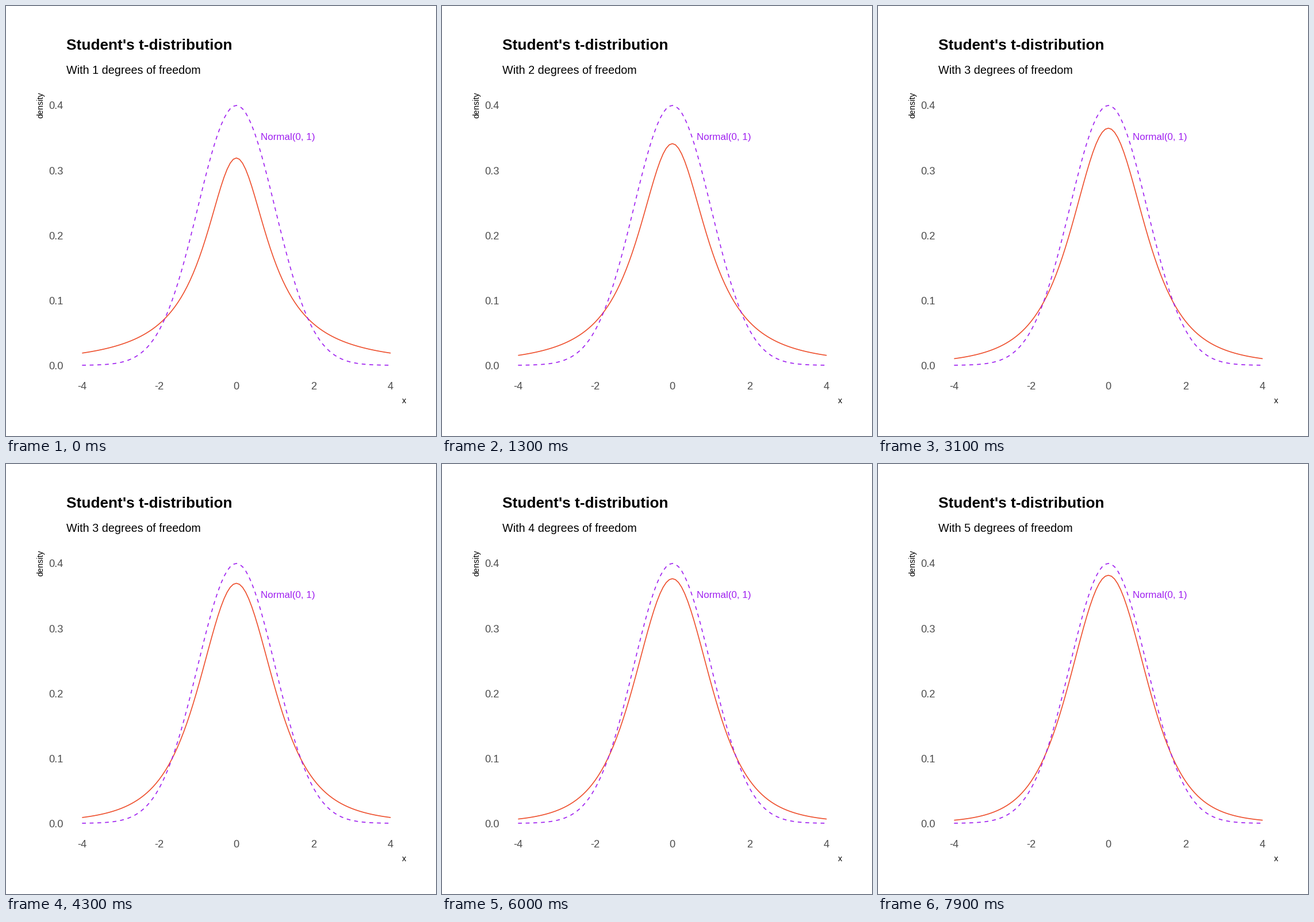
Recreate the animation shown at these times as a matplotlib script. Size 748 px wide and 748 px high, loop 8000 ms.

```python
import math

import matplotlib.pyplot as plt
import numpy as np
from matplotlib.animation import FuncAnimation

SIZE, DPI = 748, 64
FRAMES, INTERVAL = 80, 100
CYCLE, STEPS, LEAD = 17, 8, 8  # frames per state, per morph, before first morph
X0, Y0 = 400.75, 625.0         # pixel position of the data origin
SX, SY = 67.1, 1133.0          # pixels per data unit
LINE = 1.66                    # line width in pixels
RED, PURPLE, GREY = "#ee4f2d", "#a020f0", "#4d4d4d"

plt.rcParams["font.family"] = "Liberation Sans"


def pt(px):
    return px * 72 / DPI


def t_density(x, df):
    scale = math.gamma((df + 1) / 2) / (
        math.sqrt(df * math.pi) * math.gamma(df / 2))
    return scale * (1 + x**2 / df) ** (-(df + 1) / 2)


def to_y(density):
    return Y0 - SY * density


fig = plt.figure(figsize=(SIZE / DPI, SIZE / DPI), dpi=DPI, facecolor="white")
ax = fig.add_axes([0, 0, 1, 1])
ax.set_xlim(0, SIZE)
ax.set_ylim(SIZE, 0)
ax.axis("off")


def label(x, y, text, size, **style):
    return ax.text(x, y, text, fontsize=pt(size), **style)


label(105, 75.5, "Student's t-distribution", 26.3, weight="bold", color="black")
subtitle = label(105.5, 117.5, "", 19.8, color="black")
label(443.5, 232.5, "Normal(0, 1)", 17, color=PURPLE)
label(60, 172, "density", 14.3, color="black", rotation=90,
      ha="center", va="center")
label(692, 691, "x", 14.3, color="black", ha="center")

for i in range(5):
    label(100, to_y(i / 10) + 7.5, f"{i / 10:.1f}", 18.3, color=GREY, ha="right")
for v in range(-4, 5, 2):
    label(X0 + SX * v, 667, str(v), 18.3, color=GREY, ha="center")

x = np.linspace(-4, 4, 101)
px = X0 + SX * x
normal = np.exp(-x**2 / 2) / math.sqrt(2 * math.pi)
curve, = ax.plot(px, to_y(normal), color=RED, lw=pt(LINE),
                 solid_capstyle="butt", zorder=2)
ax.plot(px, to_y(normal), color=PURPLE, lw=pt(LINE), ls=(0, (4, 4)),
        dash_capstyle="butt", zorder=3)


def update(frame):
    # State 0 is the hold before the first morph.
    state, step = divmod(frame - LEAD + CYCLE, CYCLE)
    mix = min(step, STEPS) / STEPS if state else 1
    df = max(state, 1)
    old = t_density(x, df)
    new = t_density(x, df + 1) if state else old
    curve.set_ydata(to_y(old + (new - old) * mix))
    shown = df + 1 if state and mix >= 0.5 else df
    subtitle.set_text(f"With {shown} degrees of freedom")
    return curve, subtitle


anim = FuncAnimation(fig, update, frames=FRAMES, interval=INTERVAL,
                     repeat=True, repeat_delay=0)
plt.show()
```
